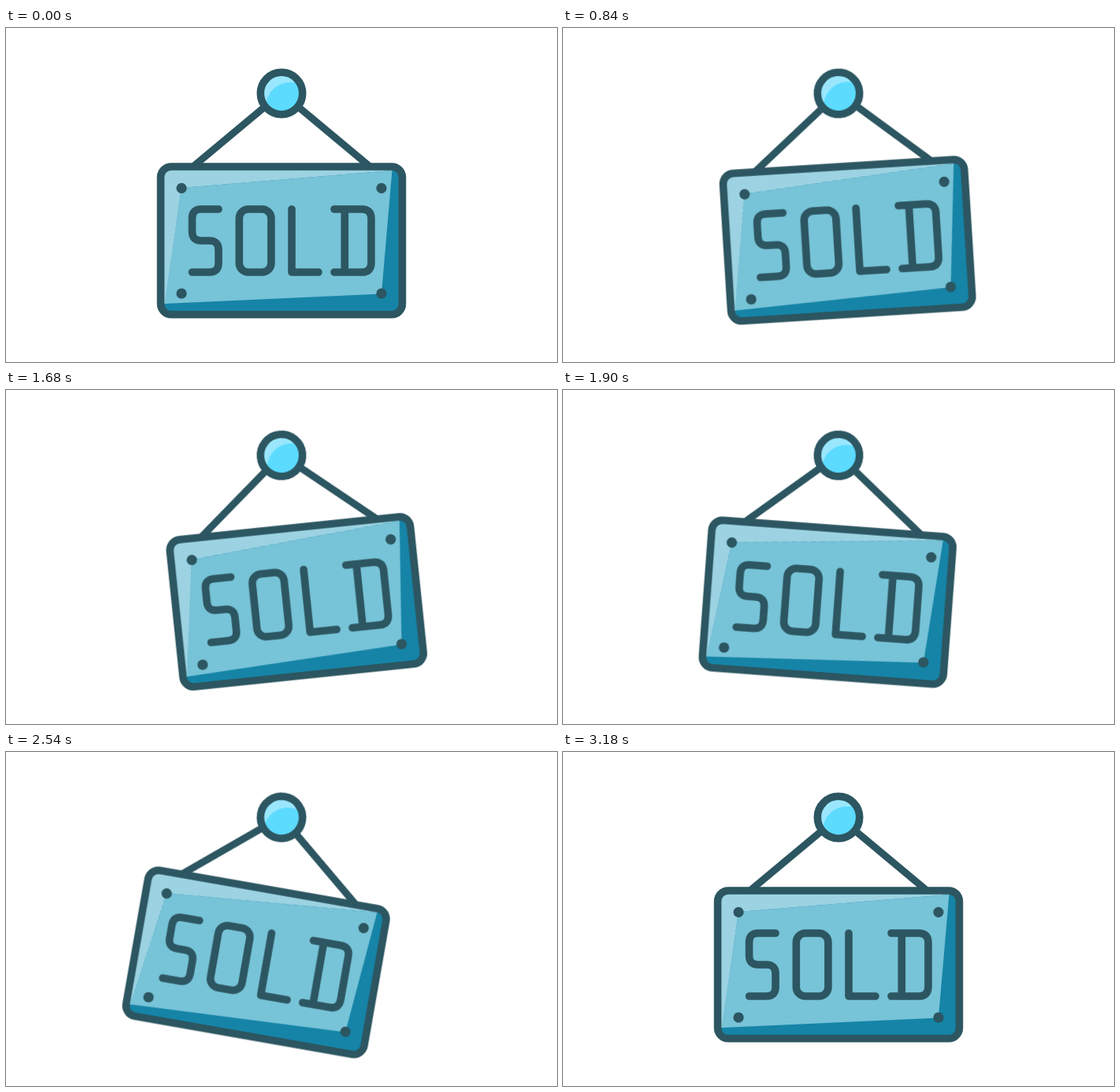
An HTML page for the animation above (3.6 s loop, 700 by 424 pixels).

```html
<!DOCTYPE html>
<html lang="en">
<head>
<meta charset="utf-8">
<title>Sold sign</title>
<style>
  html, body {
    margin: 0;
    width: 100%;
    height: 100%;
    overflow: hidden;
    background: #fff;
  }
  svg { display: block; width: 700px; height: 424px; }

  .sign {
    --ink: #2c5661;
    transform-origin: 350px 83px;
    animation: swing 3600ms cubic-bezier(.57, 0, .43, 1) infinite;
  }
  .line {
    fill: none;
    stroke: var(--ink);
    stroke-width: 9.6;
    stroke-linecap: round;
    stroke-linejoin: round;
  }
  .screws { fill: var(--ink); }

  /* rest, swing right, swing left, rest */
  @keyframes swing {
    0%, 13.89% { transform: rotate(0deg); }
    36.39% { transform: rotate(-11deg); }
    64.31% { transform: rotate(11deg); }
    88.5%, 100% { transform: rotate(0deg); }
  }
</style>
</head>
<body>
<svg viewBox="0 0 700 424" role="img" aria-label="SOLD">
  <defs>
    <clipPath id="board"><rect x="196.5" y="176" width="307" height="188" rx="13.5"/></clipPath>
    <clipPath id="knob"><circle cx="350" cy="83" r="26"/></clipPath>
  </defs>
  <g class="sign">
    <path class="line" style="stroke-width:9" d="M240 174 L330 99 M460 174 L370 99"/>

    <g clip-path="url(#knob)">
      <circle cx="350" cy="83" r="26" fill="#9ae7fd"/>
      <circle cx="361" cy="100" r="31" fill="#5cdbff"/>
    </g>
    <circle class="line" cx="350" cy="83" r="26.7"/>

    <g clip-path="url(#board)">
      <rect x="190" y="170" width="320" height="200" fill="#1584a7"/>
      <path fill="#9cd2e2" d="M190 170 H491 L490 181 L223 203 L202 350 L190 351 Z"/>
      <path fill="#77c3d7" d="M223 203 L490.5 181 L477 337.5 L201.5 350 Z"/>
    </g>
    <rect class="line" x="196.5" y="176" width="307" height="187.8" rx="13.5"/>

    <g class="screws">
      <circle cx="223" cy="203.3" r="6.6"/>
      <circle cx="477" cy="203.3" r="6.6"/>
      <circle cx="223" cy="337" r="6.6"/>
      <circle cx="477" cy="337" r="6.6"/>
    </g>

    <g class="line">
      <path d="M270 230 H248 Q236.5 230 236.5 241.5 V258.5 Q236.5 270 248 270 H258.5 Q270 270 270 281.5 V298.5 Q270 310 258.5 310 H236.5"/>
      <rect x="296.3" y="230" width="40.6" height="80" rx="11.5"/>
      <path d="M363 230 V310 H397"/>
      <path d="M417 230 H452 Q464 230 464 242 V298 Q464 310 452 310 H417 M430.3 230 V310"/>
    </g>
  </g>
</svg>
</body>
</html>
```
